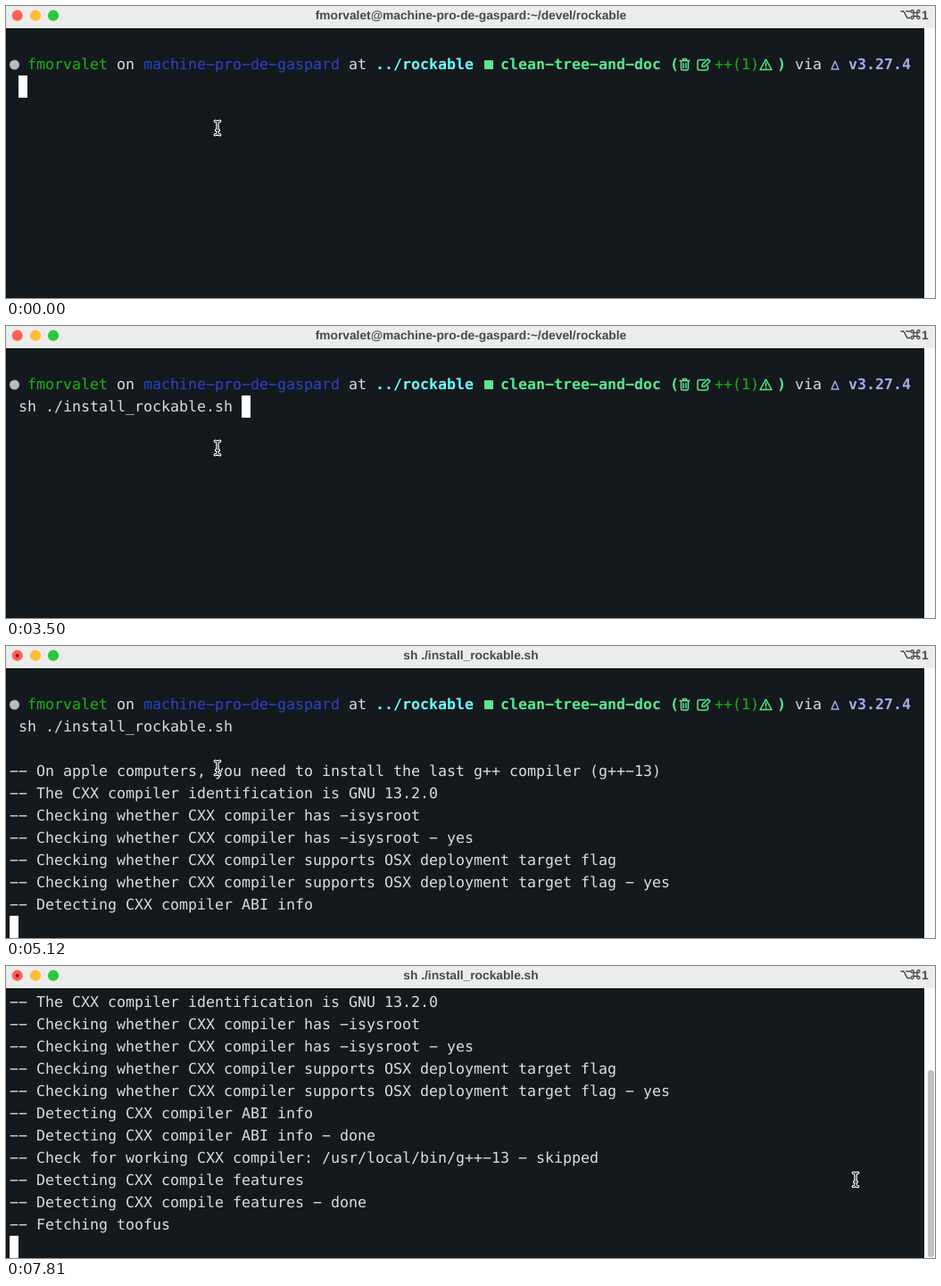
These frames come from a looping animation (1041 by 328 pixels, 8000 ms). An HTML page:

```html
<!DOCTYPE html>
<html lang="en">
<head>
<meta charset="utf-8">
<title>Terminal</title>
<style>
  html, body { margin: 0; width: 100%; height: 100%; overflow: hidden; background: #14191e; }
  svg { display: block; width: 1041px; height: 328px; }
  text { white-space: pre; text-rendering: geometricPrecision; }
  #screen text { font: 16.61px "DejaVu Sans Mono", monospace; fill: #dcdcdc; }
  #screen text.bold { font-weight: bold; }
  .bar { font: bold 13.75px "Liberation Sans", sans-serif; fill: #484848; }
  .line { fill: none; stroke-linejoin: round; stroke-linecap: round; }
</style>
</head>
<body>
<svg viewBox="0 0 1041 328">
  <rect width="1041" height="328" fill="#14191e"/>
  <g id="screen">
    <g id="prompt">
      <circle cx="9.5" cy="66" r="5.5" fill="#b9babb"/>
      <rect x="536" y="61" width="10" height="10" fill="#5be78d"/>
      <g class="line" stroke="#5be78d" stroke-width="1.5">
        <path d="M755 61.5H766M758.5 61V59.5H762.5V61M756.5 62V70Q756.5 72 758.5 72H762.5Q764.5 72 764.5 70V62M759 64.5V69.5M762 64.5V69.5"/>
        <path d="M783 60.5H777Q775 60.5 775 62.5V70Q775 72 777 72H784.5Q786.5 72 786.5 70V67"/>
        <path d="M780 68L780.5 65.5L786.5 59.5L789 62L783 68Z"/>
        <path d="M851.5 60L858 71.5H845ZM851.5 64V67.5M851.5 69.6V69.7"/>
      </g>
      <path class="line" d="M929 62L933 71H925Z" stroke="#a7abf2" stroke-width="1.4"/>
    </g>
    <rect id="caret" width="10" height="25" fill="#fff"/>
  </g>
  <rect x="1029" y="25" width="12" height="303" fill="#fafafa"/>
  <rect id="thumb" x="1033" width="7" rx="3.5" fill="#c1c1c1"/>
  <rect width="1041" height="25" fill="#ebedec"/>
  <rect y="25" width="1029" height="1" fill="#0b0e11"/>
  <circle cx="12.7" cy="10.7" r="6.1" fill="#fe5f57"/>
  <circle cx="33" cy="10.7" r="6.1" fill="#febc2e"/>
  <circle cx="53" cy="10.7" r="6.1" fill="#28c840"/>
  <circle id="dot" cx="12.7" cy="10.7" r="2" fill="#7d1712"/>
  <text id="title" class="bar" x="521" y="15" text-anchor="middle"></text>
  <path class="line" d="M1003 6H1006L1010 13.5H1013M1009 6H1013" stroke="#484848" stroke-width="1.5"/>
  <path class="line" d="M1017 5V13A1.5 1.5 0 1 1 1015.5 11.5H1022.5A1.5 1.5 0 1 1 1021 13V6A1.5 1.5 0 1 1 1022.5 7.5H1015.5A1.5 1.5 0 1 1 1017 6" stroke="#484848" stroke-width="1.3"/>
  <text class="bar" x="1026" y="14.5">1</text>
  <g id="mouse" class="line">
    <path id="beam" d="M-2.8 -7.7Q0 -7.7 0 -5Q0 -7.7 2.8 -7.7M0 -5V5M-2.8 7.7Q0 7.7 0 5Q0 7.7 2.8 7.7M-1.5 2.5H1.5" stroke="#fff" stroke-width="3"/>
    <use href="#beam"/>
    <path d="M-2.8 -7.7Q0 -7.7 0 -5Q0 -7.7 2.8 -7.7M0 -5V5M-2.8 7.7Q0 7.7 0 5Q0 7.7 2.8 7.7M-1.5 2.5H1.5" stroke="#14191e" stroke-width="1.1"/>
  </g>
</svg>
<script>
const LOOP = 8000, CELL = 10, ROW = 25, LEFT = 4, TOP = 53;
const $ = id => document.getElementById(id);
const user = "fmorvalet", host = "machine-pro-de-gaspard";
const command = "sh ./install_rockable.sh ";
const white = "#dcdcdc", green = "#14b811", mint = "#5be78d";

// column, text, colour, bold
const prompt = [
  [2, user, green], [12, "on", white], [15, host, "#2a43cb"], [38, "at", white],
  [41, "../rockable", "#6bfdff", 1], [55, "clean-tree-and-doc", mint, 1],
  [74, "(", mint, 1], [79, "++(1)", green], [86, ")", mint, 1],
  [88, "via", white], [94, "v3.27.4", "#a7abf2", 1]
];
const output = [
  "On apple computers, you need to install the last g++ compiler (g++-13)",
  "The CXX compiler identification is GNU 13.2.0",
  "Checking whether CXX compiler has -isysroot",
  "Checking whether CXX compiler has -isysroot - yes",
  "Checking whether CXX compiler supports OSX deployment target flag",
  "Checking whether CXX compiler supports OSX deployment target flag - yes",
  "Detecting CXX compiler ABI info",
  "Detecting CXX compiler ABI info - done",
  "Check for working CXX compiler: /usr/local/bin/g++-13 - skipped",
  "Detecting CXX compile features",
  "Detecting CXX compile features - done",
  "Fetching toofus"
];

// time, then the value held from there on
const typed = [[0, 0], [260, 3], [1070, 4], [1340, 5], [1880, 7], [2150, 25]];
const caretRow = [[0, 1], [4040, 4], [4850, 6], [5120, 10], [5930, 14], [6200, 15]];
const thumbTop = [[0, 328], [5930, 103], [6200, 117]];
const mouse = [
  [0, [237, 137]], [6200, [405.7, 126.3]], [6460, [539.6, 151]], [6730, [792.5, 204]],
  [7000, [829.5, 204]], [7540, [868.5, 215]], [7810, [952, 240]]
];
const at = (steps, t) => steps.filter(s => s[0] <= t).pop()[1];

// The terminal face has wide hyphens, so they are set as minus signs.
const wide = s => s.replace(/-/g, "\u2212");

function write(parent, col, row, text, colour = white, bold) {
  const el = document.createElementNS("http://www.w3.org/2000/svg", "text");
  el.setAttribute("x", LEFT + col * CELL);
  el.setAttribute("y", TOP + row * ROW + 18);
  el.style.fill = colour;
  if (bold) el.classList.add("bold");
  el.textContent = wide(text);
  parent.append(el);
  return el;
}

for (const [col, text, colour, bold] of prompt) write($("prompt"), col, 0, text, colour, bold);
const input = write($("screen"), 1, 1, "");
const lines = output.map((text, i) => write($("screen"), 0, i + 3, "-- " + text));

function draw(now) {
  const t = now % LOOP;
  const n = at(typed, t), row = at(caretRow, t), top = at(thumbTop, t);
  const running = row > 1, scroll = Math.max(0, row - 10);
  const show = (el, on) => el.setAttribute("visibility", on ? "visible" : "hidden");

  $("screen").setAttribute("transform", `translate(0 ${-scroll * ROW})`);
  input.textContent = wide(command.slice(0, n));
  lines.forEach((el, i) => show(el, i + 3 < row && i + 3 >= scroll - 1));
  $("caret").setAttribute("x", LEFT + (running ? 0 : (n + 1) * CELL));
  $("caret").setAttribute("y", TOP + row * ROW);
  $("title").textContent = running ? command.trim() : `${user}@${host}:~/devel/rockable`;
  show($("dot"), t >= 4850);
  $("thumb").setAttribute("y", top);
  $("thumb").setAttribute("height", Math.max(0, 327 - top));
  $("mouse").setAttribute("transform", `translate(${at(mouse, t)})`);
  requestAnimationFrame(loop);
}

let start;
function loop(now) {
  start ??= now;
  draw(now - start);
}
draw(0);
</script>
</body>
</html>
```
